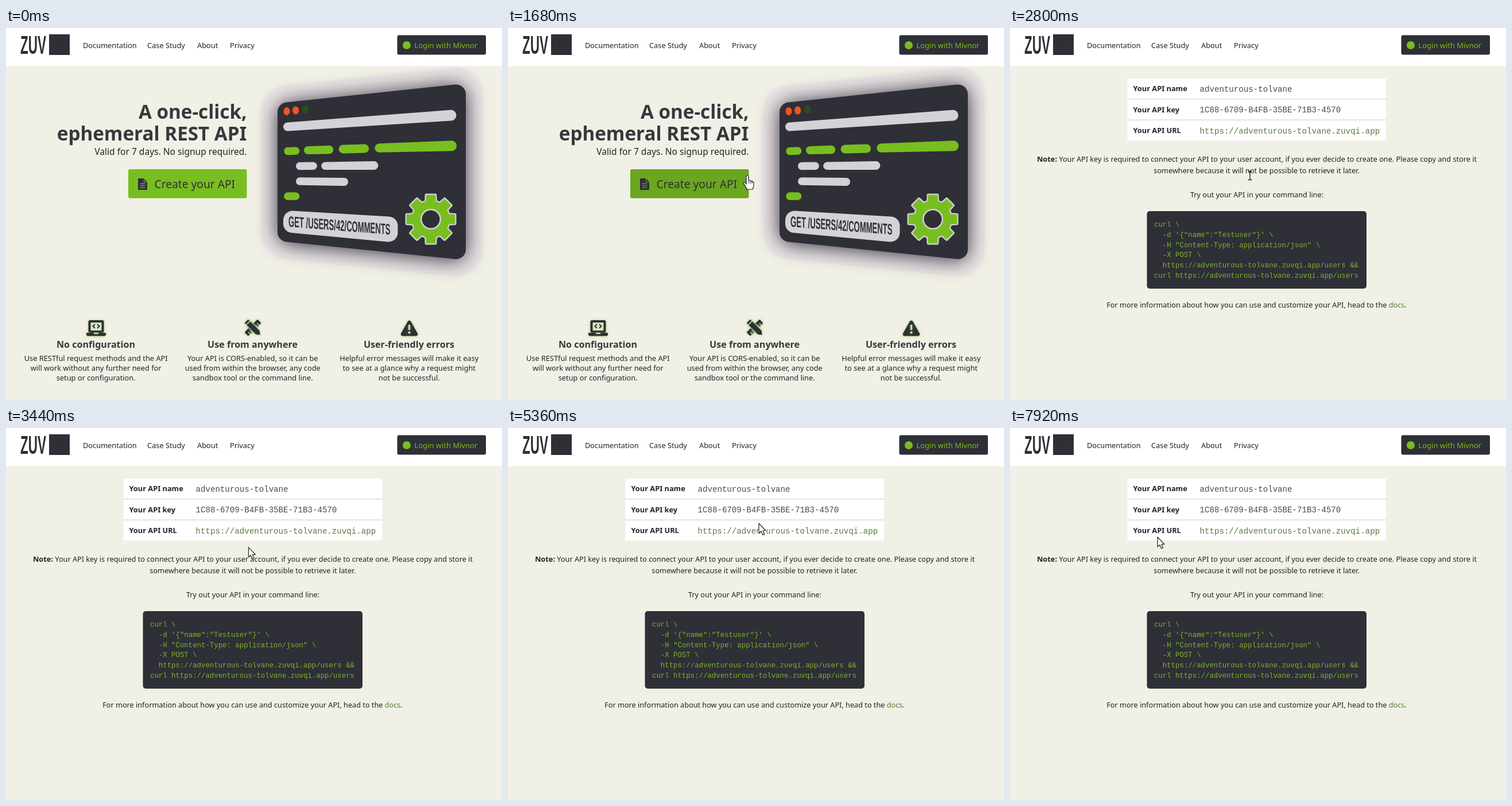
Write an HTML page with a canvas that moves like this. It is 864x648 px and loops after 8 s.

```html
<!DOCTYPE html>
<html lang="en">
<head>
<meta charset="utf-8">
<title>API landing page</title>
<style>
html, body { margin: 0; width: 100%; height: 100%; overflow: hidden; background: #f0f0e6; }
canvas { display: block; width: 864px; height: 648px; }
</style>
</head>
<body>
<canvas id="stage" width="864" height="648"></canvas>
<script>
const ctx = document.getElementById('stage').getContext('2d');
const LOOP = 8000, STEP = 80;
const PAPER = '#f0f0e6', DARK = '#2f2f37', GREEN = '#78be20', LIGHT = '#d2d2d7', INK = '#222229';
const LINK = '#587a3a', HALO = '#ece6e6';
const SANS = '"Noto Sans", "Open Sans", sans-serif';
const MONO = '"Liberation Mono", monospace';
const NARROW = 0.5;
const API = 'adventurous-tolvane';
const URL_TEXT = 'https://' + API + '.zuvqi.app';

const sans = (size, weight = 400) => `${weight} ${size}px ${SANS}`;
const mono = size => `${size}px ${MONO}`;

function text(str, x, y, font, color = INK, align = 'left') {
  ctx.font = font;
  ctx.fillStyle = color;
  ctx.textAlign = align;
  ctx.fillText(str, x, y);
}

// Centres a line made of [text, font, colour] runs.
function runs(parts, cx, y) {
  const widths = parts.map(([str, font]) => {
    ctx.font = font;
    return ctx.measureText(str).width;
  });
  let x = cx - widths.reduce((a, b) => a + b, 0) / 2;
  parts.forEach(([str, font, color], i) => {
    text(str, x, y, font, color);
    x += widths[i];
  });
}

// Condensed lettering on a baseline with the given slope.
function narrow(str, x, y, size, color, slope = 0) {
  ctx.save();
  ctx.transform(NARROW, slope * NARROW, 0, 1, x, y);
  text(str, 0, 0, `bold ${size}px "Liberation Sans", sans-serif`, color);
  ctx.restore();
}

function rect(x, y, w, h, color, r = 0) {
  ctx.fillStyle = color;
  ctx.beginPath();
  ctx.roundRect(x, y, w, h, r);
  ctx.fill();
}

function oval(x, y, rx, ry, color) {
  ctx.fillStyle = color;
  ctx.beginPath();
  ctx.ellipse(x, y, rx, ry, 0, 0, Math.PI * 2);
  ctx.fill();
}

function poly(points, color, r = 0) {
  const n = points.length, [ax, ay] = points[0], [bx, by] = points[n - 1];
  ctx.beginPath();
  ctx.moveTo((ax + bx) / 2, (ay + by) / 2);
  points.forEach(([x, y], i) => ctx.arcTo(x, y, ...points[(i + 1) % n], r));
  ctx.closePath();
  ctx.fillStyle = color;
  ctx.fill();
}

function line(points, color, width) {
  ctx.beginPath();
  points.forEach(([x, y]) => ctx.lineTo(x, y));
  ctx.strokeStyle = color;
  ctx.lineWidth = width;
  ctx.stroke();
}

// Tapered bar with round ends.
function bar(x1, y1, r1, x2, y2, r2, color) {
  const a = Math.atan2(y2 - y1, x2 - x1), q = Math.PI / 2;
  ctx.beginPath();
  ctx.arc(x1, y1, r1, a + q, a + 3 * q);
  ctx.arc(x2, y2, r2, a - q, a + q);
  ctx.fillStyle = color;
  ctx.fill();
}

function header() {
  rect(0, 0, 864, 66.5, '#fff');
  narrow('ZUV', 25, 45, 45, DARK);
  rect(75, 11, 36, 36, DARK);
  const font = sans(12.8);
  text('Documentation', 134, 34.5, font);
  text('Case Study', 246, 34.5, font);
  text('About', 333, 34.5, font);
  text('Privacy', 390, 34.5, font);
  rect(681.5, 12.5, 154.5, 34, DARK, 3);
  oval(698, 30, 7, 7, GREEN);
  text('Login with Mivnor', 711.5, 34.5, sans(12.95), GREEN);
}

function gear(cx, cy) {
  ctx.save();
  ctx.translate(cx, cy);
  ctx.beginPath();
  for (let i = 0; i < 8; i++) {
    const mid = i * Math.PI / 4 - Math.PI / 2;
    for (const [da, r] of [[-0.27, 32.5], [-0.19, 43], [0.19, 43], [0.27, 32.5]]) {
      ctx.lineTo(Math.cos(mid + da) * r, Math.sin(mid + da) * r);
    }
  }
  ctx.closePath();
  ctx.lineJoin = 'round';
  ctx.strokeStyle = LIGHT;
  ctx.lineWidth = 4.5;
  ctx.stroke();
  ctx.fillStyle = GREEN;
  ctx.fill();
  oval(0, 0, 18, 18, LIGHT);
  oval(0, 0, 15.5, 15.5, DARK);
  ctx.restore();
}

function panel() {
  const shape = [[473, 131], [801, 96.5], [801, 404.5], [473, 371]];
  ctx.save();
  ctx.lineJoin = 'round';
  ctx.shadowColor = HALO;
  ctx.shadowBlur = 5;
  poly(shape, HALO, 17);
  ctx.strokeStyle = HALO;
  ctx.lineWidth = 58;
  ctx.stroke();
  ctx.shadowColor = 'rgba(36,34,50,.95)';
  ctx.shadowBlur = 36;
  ctx.shadowOffsetY = 2;
  poly(shape, DARK, 17);
  ctx.restore();

  oval(489, 145, 5.5, 7, '#f0561c');
  oval(504.7, 143.5, 5.6, 7.1, '#f0561c');
  oval(521.6, 142, 5.8, 7.2, '#2d4b1c');

  bar(490.5, 172, 7.5, 775, 152.2, 9.4, LIGHT);
  bar(491, 214.5, 6.8, 504.5, 214, 6.8, GREEN);
  bar(526, 213, 7, 563, 212, 7.2, GREEN);
  bar(587, 211, 7.4, 624.5, 210, 7.6, GREEN);
  bar(650, 209, 7.7, 776, 205.3, 9, GREEN);
  bar(511.7, 240.5, 6.7, 535, 240.3, 6.8, LIGHT);
  bar(556, 240.2, 6.8, 641, 239.5, 7.4, LIGHT);
  bar(511.7, 267, 6.7, 589, 268, 7.1, LIGHT);
  bar(491, 293, 6.8, 504.5, 293, 6.8, GREEN);

  poly([[483, 317.5], [682.5, 329.5], [682.5, 374], [483, 355.5]], LIGHT, 16);
  narrow('GET /USERS/42/COMMENTS', 492, 346, 26.2, DARK, 0.078);
  gear(740, 333);
}

function createButton(state) {
  const fill = state === 'hover' ? '#6aa61f' : GREEN;
  rect(213, 246, 206.5, 50.5, fill, 3);
  poly([[230, 262], [240, 262], [246, 268], [246, 282], [230, 282]], DARK, 1);
  line([[240.5, 261.5], [240.5, 268], [246.5, 268]], fill, 1.2);
  for (const y of [271, 274.5, 278]) line([[233.5, y], [242.5, y]], fill, 1.3);
  text('Create your API', 258.5, 279, sans(19.2, 300), DARK);
  // Fades the button as one group.
  if (state === 'off') {
    ctx.save();
    ctx.globalAlpha = 0.52;
    rect(212, 245, 209, 53, PAPER);
    ctx.restore();
  }
}

function laptop() {
  ctx.strokeStyle = DARK;
  ctx.lineWidth = 4;
  ctx.beginPath();
  ctx.roundRect(-11.5, -11, 23, 18, 1);
  ctx.stroke();
  rect(-17, 9, 34, 5.5, DARK, [0, 0, 3, 3]);
  rect(-4, 9, 8, 1.8, PAPER);
  line([[-2, -6], [-5.5, -2.5], [-2, 1]], DARK, 2);
  line([[2, -6], [5.5, -2.5], [2, 1]], DARK, 2);
}

function tools() {
  ctx.save();
  ctx.rotate(Math.PI / 4);
  rect(-4.5, -16, 9, 32, DARK, 1.5);
  for (const y of [-11, -7, 7, 11]) line([[0, y], [4.5, y]], PAPER, 1.2);
  ctx.rotate(-Math.PI / 2);
  rect(-5.5, -9, 11, 18, PAPER);
  poly([[-4.5, -16], [4.5, -16], [4.5, 12], [0, 18], [-4.5, 12]], DARK, 1);
  line([[-5, -11.5], [5, -11.5]], PAPER, 1.3);
  ctx.restore();
}

function warning() {
  poly([[0, -15.5], [17, 14.5], [-17, 14.5]], DARK, 3);
  line([[0, -5], [0, 4]], '#c9dfa5', 3.4);
  oval(0, 8.5, 2.1, 2.1, '#c9dfa5');
}

const FEATURES = [
  [157, laptop, 'No configuration',
    ['Use RESTful request methods and the API', 'will work without any further need for', 'setup or configuration.']],
  [430, tools, 'Use from anywhere',
    ['Your API is CORS-enabled, so it can be', 'used from within the browser, any code', 'sandbox tool or the command line.']],
  [702.5, warning, 'User-friendly errors',
    ['Helpful error messages will make it easy', 'to see at a glance why a request might', 'not be successful.']]
];

function landing(buttonState) {
  text('A one-click,', 419.5, 158, sans(33.2, 700), '#37373d', 'right');
  text('ephemeral REST API', 419.5, 196, sans(33.2, 700), '#37373d', 'right');
  text('Valid for 7 days. No signup required.', 419.5, 221, sans(15.55), INK, 'right');
  createButton(buttonState);
  panel();
  for (const [cx, icon, title, lines] of FEATURES) {
    ctx.save();
    ctx.translate(cx, 522);
    ctx.shadowColor = 'rgba(120,190,32,.6)';
    ctx.shadowBlur = 4;
    icon();
    ctx.restore();
    text(title, cx - 0.5, 557, sans(16.1, 700), '#37373d', 'center');
    lines.forEach((s, i) => text(s, cx - 0.3, 579.5 + i * 17, sans(12.8), INK, 'center'));
  }
}

const CODE = [
  'curl \\',
  '  -d \'{"name":"Testuser"}\' \\',
  '  -H "Content-Type: application/json" \\',
  '  -X POST \\',
  '  ' + URL_TEXT + '/users &&',
  'curl ' + URL_TEXT + '/users'
];

function details(linkHover) {
  const body = sans(12.7), bold = sans(12.8, 700);
  rect(204.5, 88, 450.5, 108, '#fff');
  rect(204.5, 123, 450.5, 1.5, '#dcdcd8');
  rect(204.5, 159.5, 450.5, 1.5, '#dcdcd8');
  const rows = [
    ['Your API name', API, '#4a4a4a'],
    ['Your API key', '1C88-6709-B4FB-35BE-71B3-4570', '#4a4a4a'],
    ['Your API URL', URL_TEXT, linkHover ? '#363636' : LINK]
  ];
  rows.forEach(([label, value, color], i) => {
    const y = 110 + i * 36.5;
    text(label, 214.5, y, bold);
    text(value, 330.5, y + 0.5, mono(14.13), color);
  });

  runs([
    ['Note:', bold, INK],
    [' Your API key is required to connect your API to your user account, if you ever decide to create one. Please copy and store it', body, INK]
  ], 430, 233);
  text('somewhere because it will not be possible to retrieve it later.', 429.5, 253, body, INK, 'center');
  text('Try out your API in your command line:', 430, 294.5, body, INK, 'center');

  rect(238.5, 319, 382.5, 135, DARK, 5);
  CODE.forEach((s, i) => text(s, 251, 346 + i * 17.8, mono(12.36), '#78b52c'));

  runs([
    ['For more information about how you can use and customize your API, head to the ', body, INK],
    ['docs', body, LINK],
    ['.', body, INK]
  ], 429.5, 487);
}

// Pointer stops: time, x, y.
const PATH = [
  [640, 828, 328], [1440, 420, 262], [1680, 417, 257], [2560, 417, 257], [2640, 416, 255],
  [2720, 416, 255], [2800, 418, 257], [3200, 418, 257], [3840, 432, 102], [4080, 431, 99],
  [4400, 431, 99], [4800, 437, 141], [5120, 437, 141], [5520, 437, 180], [5840, 437, 180],
  [6400, 425, 277], [7520, 425, 277], [7920, 257, 190]
];

function pointerAt(t) {
  const i = PATH.findIndex(p => p[0] > t);
  if (i < 0) return PATH[PATH.length - 1].slice(1);
  const [t0, x0, y0] = PATH[i - 1], [t1, x1, y1] = PATH[i];
  const u = (t - t0) / (t1 - t0), k = u * u * (3 - 2 * u);
  return [x0 + (x1 - x0) * k, y0 + (y1 - y0) * k];
}

const within = (x, y, l, t, r, b) => x >= l && x <= r && y >= t && y <= b;
const overLink = (x, y) => within(x, y, 331, 170, 645, 188);
const overText = (x, y) =>
  within(x, y, 331, 97, 492, 115) || within(x, y, 331, 133, 577, 151) || within(x, y, 47, 218, 813, 259);

const ARROW = new Path2D('M0 0V17L4 13.5L6.7 20L9.6 18.8L7 12.5H12Z');
const HAND = new Path2D('M-2 1Q0 -2 2 1V9Q4 7 6 10Q8 8.5 9.3 11Q11 10.5 11 13V18Q10 21 9 24H-1Q-2 20 -7 14Q-7 11 -4.5 12L-2 15Z');

function pointer(kind, x, y) {
  ctx.save();
  ctx.translate(x, y);
  if (kind === 'text') {
    line([[-3.5, -7.5], [-1, -7.5], [0, -6.5], [1, -7.5], [3.5, -7.5]], '#222', 1.3);
    line([[0, -7], [0, 7]], '#222', 1.4);
    line([[-3.5, 7.5], [-1, 7.5], [0, 6.5], [1, 7.5], [3.5, 7.5]], '#222', 1.3);
  } else if (kind === 'no') {
    oval(0, 0, 8.5, 8.5, '#dd4420');
    oval(0, 0, 6, 6, '#fff');
    line([[-5, -5], [5, 5]], '#dd4420', 2.8);
  } else {
    const shape = kind === 'hand' ? HAND : ARROW;
    ctx.fillStyle = '#fff';
    ctx.fill(shape);
    ctx.strokeStyle = '#222';
    ctx.lineWidth = 1.2;
    ctx.lineJoin = 'round';
    ctx.stroke(shape);
    if (kind === 'hand') {
      for (const kx of [2, 5, 8]) line([[kx, 10], [kx, 14]], '#222', 1);
    }
  }
  ctx.restore();
}

function draw(t) {
  const shown = t >= PATH[0][0];
  const [x, y] = shown ? pointerAt(t) : [0, 0];
  let kind = 'arrow';
  rect(0, 0, 864, 648, PAPER);
  header();
  if (t < 2800) {
    const off = t >= 2640;
    const hover = shown && within(x, y, 213, 246, 420.5, 297);
    landing(off ? 'off' : hover ? 'hover' : 'idle');
    if (off) kind = 'no';
    else if (hover) kind = 'hand';
  } else {
    const hover = overLink(x, y);
    details(hover);
    if (hover) kind = 'hand';
    else if (overText(x, y)) kind = 'text';
  }
  if (shown) pointer(kind, x, y);
}

function tick() {
  const t = performance.now() % LOOP;
  draw(Math.floor(t / STEP) * STEP);
  requestAnimationFrame(tick);
}
tick();
</script>
</body>
</html>
```
